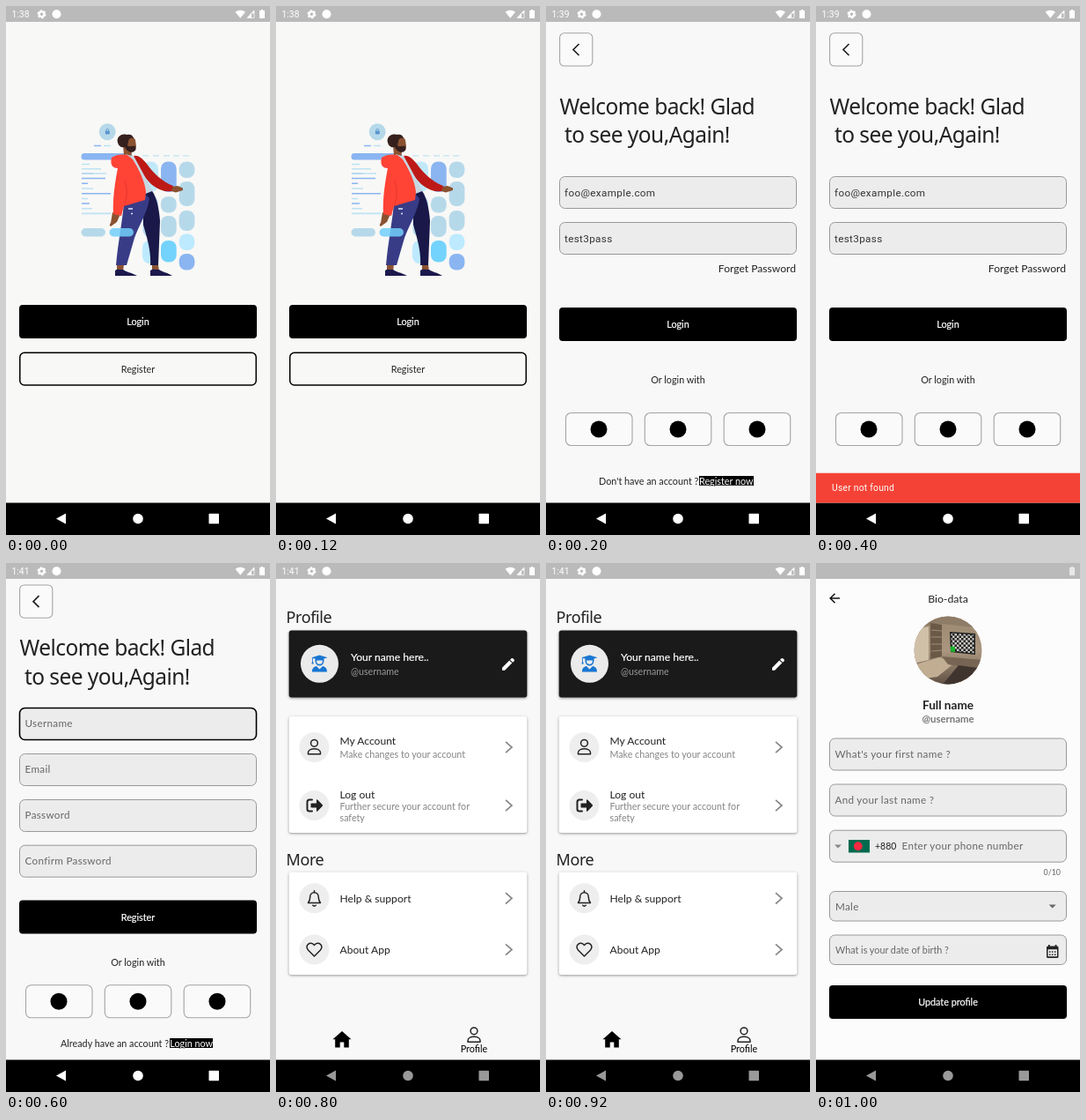
Animation of 300 by 600 pixels, one loop 1200 ms. Source, as an HTML page:

```html
<!DOCTYPE html>
<html lang="en">
<head>
<meta charset="utf-8">
<title>App screens</title>
<style>
html, body { margin: 0; width: 100%; height: 100%; overflow: hidden; background: #f8f8f8; }
svg { display: block; width: 100vw; height: 100vh; font: 10.8px Lato, sans-serif; }
text { fill: #222; white-space: pre; }
.screen { animation: show 1200ms step-end infinite; animation-delay: calc(var(--i) * 200ms - 1200ms); }
@keyframes show {
  0% { visibility: visible; }
  16.666%, 100% { visibility: hidden; }
}
.head { font: 24.5px "Noto Sans", sans-serif; letter-spacing: -.56px; }
.title { font: 18px "Noto Sans", sans-serif; letter-spacing: -.4px; }
.mid { text-anchor: middle; }
.input { font: 11.7px Roboto, sans-serif; letter-spacing: .35px; fill: #333; }
.hint { font-size: 11.7px; letter-spacing: .3px; fill: #666; }
.item { font-size: 12.1px; }
.sub { font-size: 10.7px; fill: #858585; }
.btn { text-anchor: middle; fill: #fff; stroke: #fff; stroke-width: .22px; }
.link { fill: #fff; text-decoration: underline; }
.clock { font: 10.4px Roboto, sans-serif; fill: #fff; }
.box { fill: #ececec; stroke: #999; }
.frame { fill: #fafafa; stroke: #a4a4a4; stroke-width: 1.1; }
.line { fill: none; stroke: #222; stroke-width: 1.5; stroke-linecap: round; stroke-linejoin: round; }
.card { filter: drop-shadow(0 1.5px 1.5px #0006); }
</style>
</head>
<body>
<svg viewBox="0 0 300 600" preserveAspectRatio="none">
<defs>
  <g id="battery"><path d="M290 4h2v1h2v9h-6V5h2z"/></g>
  <g id="status">
    <path fill="#bababa" d="M0 0h300v18H0z"/>
    <g fill="#fff">
      <circle cx="40.5" cy="9.3" r="2.9" fill="none" stroke="#fff" stroke-width="2.4"/>
      <circle cx="40.5" cy="9.3" r="4.4" fill="none" stroke="#fff" stroke-width="1.3" stroke-dasharray="2.3 2.3"/>
      <circle cx="57.5" cy="9.3" r="5"/>
      <path d="M260.5 6.8Q266.300 2.500 272 6.800L266.300 13.800z"/>
      <path d="M274 13.500L282 5v3.500h-3v5z"/>
      <path d="M274 13.500L282 5v8.500z" fill="none" stroke="#fff" stroke-width=".7"/>
      <use href="#battery"/>
    </g>
  </g>
  <g id="nav">
    <path fill="#000" d="M0 563.500h300V600H0z"/>
    <path d="M57 581.500L68 575.500v12z"/>
    <circle cx="150" cy="581.500" r="5.800"/>
    <rect x="230.500" y="575.800" width="11.500" height="11.500" rx=".8"/>
  </g>
  <rect id="field" x="15.500" y=".5" width="269" height="36" rx="6"/>
  <rect id="button" x="15" width="270" height="38" rx="4"/>
  <g id="back">
    <rect class="frame" x="15.600" y="30.800" width="37.200" height="37.200" rx="5"/>
    <path class="line" d="M37.500 43L31 49.500l6.500 6.500" style="stroke-linecap:butt;stroke-linejoin:miter;stroke-width:1.700"/>
  </g>
  <g id="welcome">
    <text class="head" x="15.500" y="123">Welcome back! Glad</text>
    <text class="head" x="21" y="155.300">to see you,Again!</text>
  </g>
  <g id="social">
    <rect class="frame" x="22.500" y="461.500" width="75.500" height="37" rx="6"/>
    <rect class="frame" x="112.300" y="461.500" width="75.500" height="37" rx="6"/>
    <rect class="frame" x="202.200" y="461.500" width="75.500" height="37" rx="6"/>
    <circle cx="60" cy="480" r="9.500"/>
    <circle cx="150" cy="480" r="9.500"/>
    <circle cx="240" cy="480" r="9.500"/>
  </g>
  <path id="next" d="M261 -6.200l7 6.200l-7 6.200" fill="none" stroke="#888" stroke-width="1.700"/>
  <g id="person" class="line">
    <circle r="3.900" cy="-4.200"/>
    <path d="M-7 8.300v-1.500c0-6 14-6 14 0v1.500z"/>
  </g>
  <pattern id="check" width="5" height="5" patternUnits="userSpaceOnUse">
    <path fill="#c9c7c2" d="M0 0h5v5H0z"/>
    <path fill="#222" d="M0 0h2.500v2.500H0zM2.500 2.500H5V5H2.500z"/>
  </pattern>
  <linearGradient id="room" x2="0" y2="1">
    <stop offset="0" stop-color="#9c8871"/>
    <stop offset=".5" stop-color="#aa967e"/>
    <stop offset="1" stop-color="#5c4c40"/>
  </linearGradient>
  <clipPath id="round"><circle cx="150" cy="99" r="38.500"/></clipPath>
</defs>

<!-- Start -->
<g>
  <path fill="#f8f8f6" d="M0 0h300v600H0z"/>
  <use href="#status"/>
  <text class="clock" x="6.500" y="13">1:38</text>
  <g fill="#b6d9ea">
    <circle cx="115.200" cy="142.800" r="9.500"/>
    <rect x="112.800" y="141.800" width="5" height="3.800" rx="1" fill="#5b95cf"/>
    <path d="M113.800 142v-1a1.500 1.500 0 0 1 3 0v1" fill="none" stroke="#5b95cf" stroke-width=".9"/>
    <rect x="85.500" y="167" width="58" height="7.500" rx="3.500" fill="#8ab5f1"/>
    <g fill="none" stroke-width="1.600">
      <path stroke="#8ab5f1" d="M100 158.500h8M86 190h13M86 195.500h27M86 201.300h7M86 212.700h33M86 224h9"/>
      <path stroke="#bde3f4" d="M111 158.500h8M86 179.500h9M86 184.700h22M86 190h28M86 207h13M86 218.500h7M86 229.700h12M86 235.400h33"/>
      <path stroke="#c9e7f4" d="M155 169.700h7m5 0h7m5 0h7m4 0h7m4 0h7"/>
    </g>
    <rect x="85.500" y="252" width="27.500" height="9.500" rx="4.700"/>
    <rect x="155.500" y="176.500" width="17.500" height="34" rx="8" fill="#bfe9f9"/>
    <rect x="155.500" y="216" width="17.500" height="46" rx="8"/>
    <rect x="155" y="266" width="18" height="26" rx="8" fill="#bdeaff"/>
    <rect x="176" y="176.500" width="17.700" height="34.500" rx="8" fill="#8ab5f1"/>
    <rect x="176" y="216" width="17.700" height="18.500" rx="8"/>
    <rect x="176" y="238" width="17.700" height="24" rx="8"/>
    <rect x="176" y="266" width="17.700" height="24.500" rx="8" fill="#73d3fc"/>
    <rect x="196.700" y="176.500" width="17.700" height="18.500" rx="8"/>
    <rect x="196.700" y="199" width="17.700" height="28" rx="8"/>
    <rect x="196.700" y="232" width="17.700" height="23" rx="8"/>
    <rect x="196.700" y="258.500" width="17.700" height="18.500" rx="8" fill="#bdeaff"/>
    <rect x="196.700" y="281" width="17.700" height="18.500" rx="8" fill="#8ab5f1"/>
  </g>
  <g fill="#8b5232">
    <path d="M188 205l7-1 6 2.500v2.500l-8 2.500-7-2zM121 234l9 2-4 9-7 5c-2-1-1-3 0-4zM126 293h8l-1 8h-7zM166 293h7l1 8h-8z"/>
    <path d="M133 158l1 11 8 6 1-11z"/>
    <path d="M133 150c5-4 12-3 14 2l1 7c-1 5-7 6-10 3z"/>
  </g>
  <path fill="#35201d" d="M127 155c-2-6 4-11 10-9 4-1 7 0 8 4-4-1-6 1-6 4l-1 4c2 3 6 0 9 1 2 4-1 7-5 7-4-1-6-4-7-6-4 1-7-1-8-5z"/>
  <path fill="#c7d6e1" d="M136 168l10 3 21 40-10 4z"/>
  <path fill="#bd1916" d="M145 170c5-1 9 2 15 9 7 10 17 20 30 25l-2 6c-12 2-25-7-31-18z"/>
  <path fill="#191848" d="M156 214l10-4c5 6 8 20 9 34l-2 50h-9c1-17-4-31-8-46z"/>
  <path fill="#383c86" d="M134 224l24-11 5 5c-2 16-13 33-17 45l-9 31H125c2-24 7-48 9-70z"/>
  <path fill="#1c194d" d="M124 300c2-2 5-1 9-1 4 3 9 3 16 7h-25zM164 300c2-2 6-1 10-1 4 3 9 3 15 7h-25z"/>
  <path fill="#ff4335" d="M120 172c5-4 13-4 18-3l6 5c7 11 14 25 15 37l-1 9-24 7-3 11-9-2c-1-18 2-36 5-52-6 0-9-4-7-12z"/>
  <path fill="none" stroke="#d93329" stroke-width=".7" d="M134 227c4-8 4-18 1-29"/>
  <rect x="117.500" y="252" width="27.500" height="9.500" rx="4.700" fill="#72cffa" opacity=".85"/>
  <path stroke="#dcecff" stroke-width="1.500" d="M139 230h5M142 235.400h2"/>
  <use href="#button" y="339"/>
  <text class="btn" x="150" y="362">Login</text>
  <rect x="15.800" y="393.200" width="268.400" height="36.800" rx="5" fill="none" stroke="#000" stroke-width="1.500"/>
  <text class="mid" x="150" y="415.500">Register</text>
  <use href="#nav" fill="#fff"/>
</g>

<!-- Login -->
<g class="screen" style="--i:1">
  <path fill="#f8f8f8" d="M0 0h300v600H0z"/>
  <g id="login">
    <use href="#status"/>
    <text class="clock" x="6.500" y="13">1:39</text>
    <use href="#back"/>
    <use href="#welcome"/>
    <use href="#field" class="box" y="193"/>
    <text class="input" x="21" y="215.500">foo@example.com</text>
    <use href="#field" class="box" y="245"/>
    <text class="input" x="21" y="267.500">test3pass</text>
    <text class="item" x="284" y="301.500" text-anchor="end">Forget Password</text>
    <use href="#button" y="342"/>
    <text class="btn" x="150" y="365">Login</text>
    <text class="mid" x="150" y="428">Or login with</text>
    <use href="#social"/>
    <use href="#nav" fill="#fff"/>
  </g>
  <text x="60" y="542.500">Don't have an account ?</text>
  <path d="M174 533h62v11.500h-62z"/>
  <text class="link" x="174" y="542.800">Register now</text>
</g>

<!-- Login failed -->
<g class="screen" style="--i:2">
  <path fill="#f8f8f8" d="M0 0h300v600H0z"/>
  <use href="#login"/>
  <path fill="#f44336" d="M0 529.700h300v33.800H0z"/>
  <text x="18" y="550" style="font:10.300px Roboto,sans-serif;letter-spacing:.25px;fill:#fff">User not found</text>
</g>

<!-- Register -->
<g class="screen" style="--i:3">
  <path fill="#f8f8f8" d="M0 0h300v600H0z"/>
  <use href="#status"/>
  <text class="clock" x="6.500" y="13">1:41</text>
  <use href="#back" y="-5.800"/>
  <use href="#welcome" y="-17.700"/>
  <use href="#field" y="164" fill="#ececec" stroke="#000" stroke-width="1.600"/>
  <use href="#field" class="box" y="216"/>
  <use href="#field" class="box" y="268"/>
  <use href="#field" class="box" y="319.700"/>
  <text class="hint" x="21.500" y="186">Username</text>
  <text class="hint" x="21.500" y="238">Email</text>
  <text class="hint" x="21.500" y="290">Password</text>
  <text class="hint" x="21.500" y="342">Confirm Password</text>
  <use href="#button" y="382.500"/>
  <text class="btn" x="150" y="405.700">Register</text>
  <text class="mid" x="150" y="457.300">Or login with</text>
  <use href="#social" y="17.300"/>
  <text x="62" y="548.700">Already have an account ?</text>
  <path d="M186 539h49v11.500h-49z"/>
  <text class="link" x="186.300" y="549">Login now</text>
  <use href="#nav" fill="#fff"/>
</g>

<!-- Profile -->
<g class="screen" style="--i:4">
  <path fill="#f8f8f8" d="M0 0h300v600H0z"/>
  <use href="#status"/>
  <text class="clock" x="6.500" y="13">1:41</text>
  <text class="title" x="11.500" y="68">Profile</text>
  <rect class="card" x="14.700" y="76.500" width="270.600" height="76" rx="3" fill="#1a1a1a"/>
  <circle cx="49.500" cy="114.300" r="21.500" fill="#ebebeb"/>
  <g fill="#1976d2">
    <path d="M49.500 104.500l9 2.700-4 1.400v2.400a5 5.500 0 0 1-10 0v-2.400l-2.500-.7v3.600l.8 3h-2.400l.8-3v-3.900l-.7-.4z"/>
    <path d="M41 123.500c0-4 2-6 5-6.500l3.500 3.500 3.500-3.500c3 .5 5 2.500 5 6.500z"/>
    <path fill="#ebebeb" d="M46.200 110.500h6.600v1.300a3.300 3 0 0 1-6.600 0z"/>
  </g>
  <text class="item" x="85" y="111" style="fill:#fff;stroke:#fff;stroke-width:.2px">Your name here..</text>
  <text class="sub" x="85" y="126.500" style="fill:#999">@username</text>
  <path fill="#fff" d="M257 118.800l8.200-8.200 3 3-8.200 8.200h-3zM266 109.800l1.500-1.500q1-.7 1.800 0l1.300 1.300q.6.900 0 1.700l-1.600 1.500z"/>

  <rect class="card" x="14.700" y="174" width="270.600" height="132" rx="3" fill="#fff"/>
  <rect class="card" x="14.700" y="350.500" width="270.600" height="116.500" rx="3" fill="#fff"/>
  <g fill="#eee">
    <circle cx="43.500" cy="209" r="17"/>
    <circle cx="43.500" cy="275" r="17"/>
    <circle cx="43.500" cy="380.300" r="17"/>
    <circle cx="43.500" cy="438.500" r="17"/>
  </g>
  <use href="#person" x="43.500" y="208.500"/>
  <path class="line" style="stroke-width:2" d="M41 268.500h-3q-2.500 0-2.500 2.500v8q0 2.500 2.500 2.500h3"/>
  <path fill="#222" d="M40.500 272.600h5.500v-3.800q.3-.9 1.200-.3l5.600 5.800q.6.700 0 1.400l-5.600 5.800q-.9.600-1.200-.3v-3.800h-5.500q-1 0-1-1v-2.800q0-1 1-1z"/>
  <path class="line" d="M43.500 371.800v1.700M36.500 385.500c2-2.500 2.200-4 2.200-6.500 0-7 9.600-7 9.600 0 0 2.500.2 4 2.200 6.500zM41.800 388.300q1.700 1.600 3.400 0"/>
  <path class="line" d="M43.500 446l-7-7c-4.500-5 2.500-11 7-5.500 4.500-5.500 11.500.5 7 5.500z"/>
  <text class="item" x="72.500" y="206">My Account</text>
  <text class="sub" x="72.500" y="221">Make changes to your account</text>
  <text class="item" x="72.500" y="267">Log out</text>
  <text class="sub" x="72.500" y="280">Further secure your account for</text>
  <text class="sub" x="72.500" y="292.800">safety</text>
  <text class="title" x="11.500" y="343">More</text>
  <text class="item" x="72.500" y="385">Help &amp; support</text>
  <text class="item" x="72.500" y="443">About App</text>
  <use href="#next" y="209"/>
  <use href="#next" y="275"/>
  <use href="#next" y="380.300"/>
  <use href="#next" y="438.500"/>
  <path d="M75 531l10.500 9.300h-2.700v9.200h-5.500v-6h-4.600v6h-5.500v-9.200h-2.700z"/>
  <use href="#person" x="225" y="535"/>
  <text class="mid" x="225" y="554.500" style="fill:#000">Profile</text>
  <use href="#nav" fill="#999"/>
</g>

<!-- Bio-data -->
<g class="screen" style="--i:5">
  <path fill="#fcfcfc" d="M0 0h300v600H0z"/>
  <path fill="#bababa" d="M0 0h300v18H0z"/>
  <use href="#battery" fill="#e8e8e8"/>
  <path d="M27 40H16.500M21.500 34.800L16.200 40l5.300 5.200" fill="none" stroke="#111" stroke-width="1.500"/>
  <text class="mid" x="150" y="44.500" style="font-size:12.300px">Bio-data</text>
  <g clip-path="url(#round)">
    <path fill="url(#room)" d="M110 60h80v80h-80z"/>
    <path fill="#8f7c67" d="M110 60h80v14l-46-5-34 4z"/>
    <path fill="#d0c0a8" d="M110 76l18-4v38l-18 4z"/>
    <path fill="#6b5948" d="M130 68l13 2v36l-13 3z"/>
    <path stroke="#a18d76" d="M131 76l12 1M131 84h12M131 92h12M131 100l12-1"/>
    <path fill="#c1ad92" d="M110 116l30-9 18 6-20 16-28 4z"/>
    <path fill="#776452" d="M143 106l47 4v12l-40-7z"/>
    <path fill="#40352e" d="M162 116l28 4v20h-48z"/>
    <path fill="#222" d="M152 78l29 2v24l-28-3z"/>
    <path fill="url(#check)" d="M153.500 79.500l26 2v21l-25-3z"/>
    <path fill="#18b52c" d="M153 94.500l5 .5v6l-5-.5z"/>
  </g>
  <text class="mid" x="150" y="166.300" style="font-size:13.600px;font-weight:700">Full name</text>
  <text class="mid" x="150" y="181" style="font-size:11.400px;font-weight:700;fill:#777">@username</text>
  <use href="#field" class="box" y="198.500"/>
  <use href="#field" class="box" y="250.500"/>
  <use href="#field" class="box" y="302.700"/>
  <rect class="box" x="15.500" y="372.500" width="269" height="33.500" rx="6"/>
  <rect class="box" x="15.500" y="422" width="269" height="33.500" rx="6"/>
  <text class="hint" x="21.500" y="221">What's your first name ?</text>
  <text class="hint" x="21.500" y="273">And your last name ?</text>
  <path fill="#888" d="M21 319.500h8l-4 4z"/>
  <path fill="#006a4e" d="M37 314h24v14.500H37z"/>
  <circle cx="47.800" cy="321.200" r="4.900" fill="#f42a41"/>
  <text x="67" y="325" style="font-size:10.500px">+880</text>
  <text class="hint" x="97.500" y="325.300">Enter your phone number</text>
  <text x="278" y="354.300" text-anchor="end" style="font-size:8.900px;fill:#666">0/10</text>
  <text class="hint" x="22" y="394">Male</text>
  <path fill="#666" d="M264.700 387.500h8l-4 4z"/>
  <text x="22" y="443" style="fill:#666">What is your date of birth ?</text>
  <path fill="#222" fill-rule="evenodd" d="M264 433h1.700v1.500h6V433h1.700v1.500h.6q1.500 0 1.500 1.500v10.500q0 1.500-1.500 1.500h-10.500q-1.500 0-1.500-1.500V436q0-1.500 1.500-1.500h.5zM263.500 438.300v8h10.500v-8z"/>
  <path stroke="#222" stroke-width="1.600" stroke-dasharray="1.600 1.400" d="M264.900 441h8M264.900 444.200h8"/>
  <use href="#button" y="479"/>
  <text class="btn" x="150" y="502">Update profile</text>
  <use href="#nav" fill="#999"/>
</g>
</svg>
</body>
</html>
```
